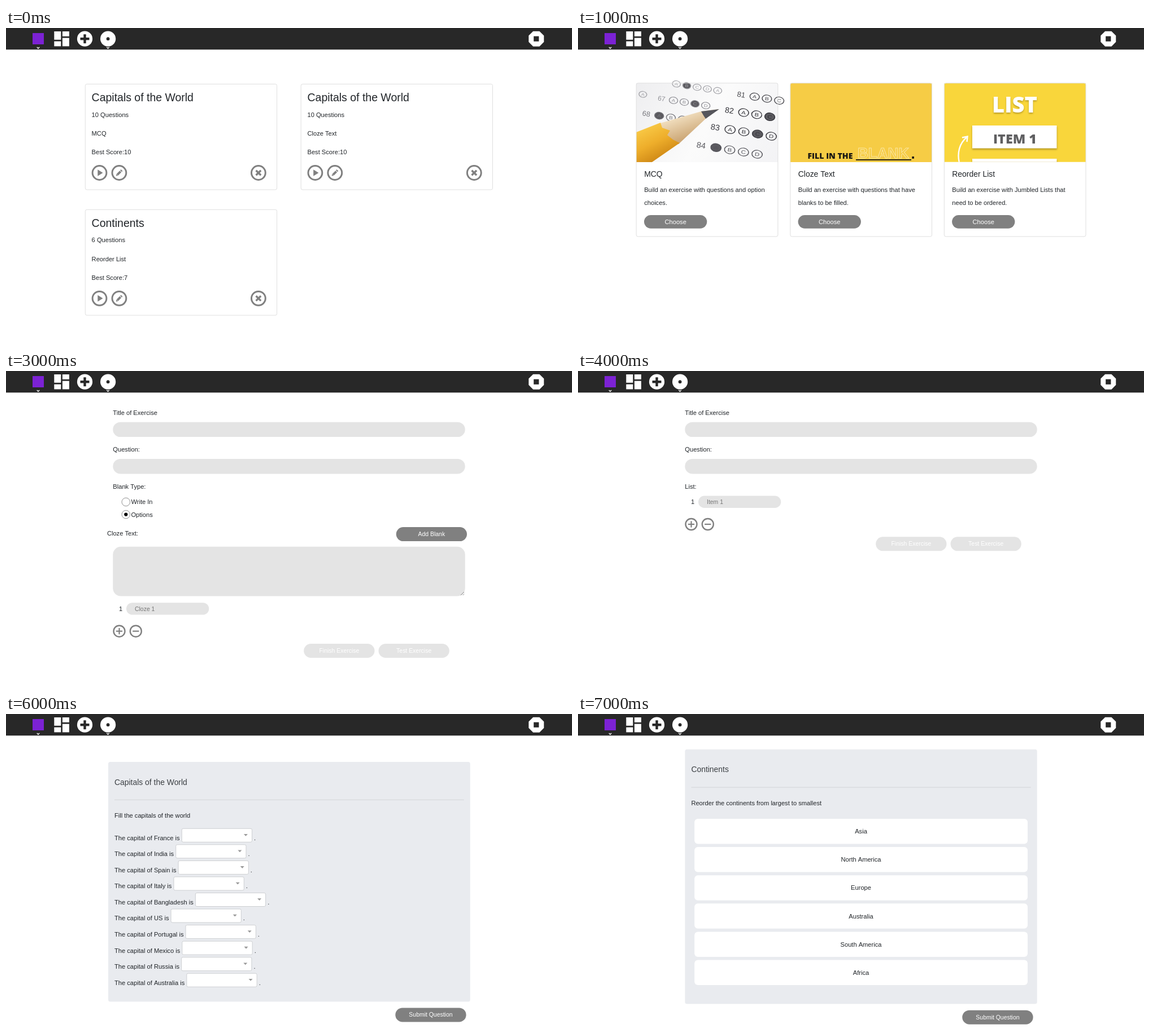
An HTML page with a canvas that plays this animation: 1002 px wide and 559 px high, repeating every 8000 ms.

```html
<!DOCTYPE html>
<html lang="en">
<head>
<meta charset="utf-8">
<title>Exercise builder</title>
<style>
html, body { margin: 0; width: 100%; height: 100%; overflow: hidden; background: #fff; }
canvas { display: block; }
</style>
</head>
<body>
<canvas id="stage" width="1002" height="559"></canvas>
<script>
const ctx = document.getElementById('stage').getContext('2d');
const SANS = '"Liberation Sans", Arial, sans-serif';
const POSTER = '"Open Sans", "Liberation Sans Narrow", sans-serif';
const INK = '#212529', GRAY = '#808080', PALE = '#e4e4e4', BAR = '#282828', PANEL = '#e9ebef';
const BASE = 11.13, SMALL = 10.44, HEAD = 13.92, TITLE = 19.48;
const SCENE_MS = 1000;

// y is the middle of the capitals
function text(s, x, y, size = BASE, color = INK, align = 'left') {
  ctx.font = `${size}px ${SANS}`;
  ctx.textAlign = align;
  ctx.fillStyle = color;
  ctx.fillText(s, x, y + size * 0.36);
}

function rect(x, y, w, h, color) {
  ctx.fillStyle = color;
  ctx.fillRect(x, y, w, h);
}

function box(x, y, w, h, r, fill, stroke) {
  ctx.beginPath();
  ctx.roundRect(x, y, w, h, r);
  if (fill) { ctx.fillStyle = fill; ctx.fill(); }
  if (stroke) { ctx.strokeStyle = stroke; ctx.lineWidth = 1; ctx.stroke(); }
}

function disc(x, y, r, color) {
  ctx.beginPath();
  ctx.arc(x, y, r, 0, Math.PI * 2);
  ctx.fillStyle = color;
  ctx.fill();
}

function ring(x, y, r, width, color = GRAY) {
  ctx.beginPath();
  ctx.arc(x, y, r, 0, Math.PI * 2);
  ctx.lineWidth = width;
  ctx.strokeStyle = color;
  ctx.stroke();
}

function poly(points, color) {
  ctx.beginPath();
  points.forEach(([x, y]) => ctx.lineTo(x, y));
  ctx.closePath();
  ctx.fillStyle = color;
  ctx.fill();
}

function line(points, width, color) {
  ctx.beginPath();
  points.forEach(([x, y]) => ctx.lineTo(x, y));
  ctx.lineWidth = width;
  ctx.strokeStyle = color;
  ctx.stroke();
}

function button(label, x, y, w = 125.3, color = GRAY, h = 25, size = SMALL) {
  box(x, y, w, h, h / 2, color);
  text(label, x + w / 2, y + h / 2 - 0.2, size, '#fff', 'center');
}

function toolbar() {
  rect(0, 0, 1002, 38.3, BAR);
  rect(47, 9, 20, 20, '#7c22d4');
  for (const x of [57, 180.5]) line([[x - 2.2, 34], [x, 36.2], [x + 2.2, 34]], 1.4, '#fff');

  rect(85.3, 6, 12, 14.8, '#fff');
  rect(85.3, 23.6, 12, 8.8, '#fff');
  rect(99.9, 6, 12, 8.8, '#fff');
  rect(99.9, 17.6, 12, 14.8, '#fff');

  disc(139.5, 19.2, 13.6, '#fff');
  rect(131.5, 17, 16, 4.4, BAR);
  rect(137.3, 11.2, 4.4, 16, BAR);

  disc(180.6, 19.2, 13.6, '#fff');
  disc(180.6, 19.2, 2.9, BAR);

  const octagon = Array.from({ length: 8 }, (_, i) => {
    const a = (i + 0.5) * Math.PI / 4;
    return [938.8 + 14.6 * Math.cos(a), 19.2 + 14.6 * Math.sin(a)];
  });
  poly(octagon, '#fff');
  rect(934.2, 14.6, 9.2, 9.2, BAR);
}

function quizCard(x, y, title, count, kind, score) {
  box(x + 0.5, y + 0.5, 339.3, 187.5, 3, '#fff', '#dfdfdf');
  const left = x + 11.8;
  text(title, left, y + 23.8, TITLE);
  text(`${count} Questions`, left, y + 54.5);
  text(kind, left, y + 88);
  text(`Best Score:${score}`, left, y + 121.4);

  const cy = y + 158;
  const [play, edit, drop] = [x + 25.7, x + 60.6, x + 307.1];
  for (const cx of [play, edit, drop]) ring(cx, cy, 12.4, 3);
  poly([[play - 3.2, cy - 5.7], [play + 6, cy], [play - 3.2, cy + 5.7]], GRAY);
  line([[edit - 3.3, cy + 3.3], [edit + 2.4, cy - 2.4]], 4, GRAY);
  line([[edit + 3.1, cy - 3.1], [edit + 4.6, cy - 4.6]], 4, GRAY);
  poly([[edit - 5.6, cy + 5.6], [edit - 5.1, cy + 2.2], [edit - 2.2, cy + 5.1]], GRAY);
  line([[drop - 4.3, cy - 4.3], [drop + 4.3, cy + 4.3]], 3.4, GRAY);
  line([[drop - 4.3, cy + 4.3], [drop + 4.3, cy - 4.3]], 3.4, GRAY);
}

function dashboard() {
  quizCard(139.8, 99, 'Capitals of the World', 10, 'MCQ', 10);
  quizCard(521.7, 99, 'Capitals of the World', 10, 'Cloze Text', 10);
  quizCard(139.8, 321.8, 'Continents', 6, 'Reorder List', 7);
}

// Picks the largest poster size that keeps the words inside the width
function posterFont(s, width, max) {
  ctx.fontStretch = 'condensed';
  ctx.font = `800 ${max}px ${POSTER}`;
  const size = Math.min(max, max * width / ctx.measureText(s).width);
  ctx.font = `800 ${size}px ${POSTER}`;
  ctx.textAlign = 'left';
}

function bubbleRow(x, y, label, count, filled, tone, step = 24.6, r = 8) {
  ctx.save();
  ctx.translate(x, y);
  ctx.rotate(0.16);
  if (label) text(label, 0, 0, r * 1.8, tone, 'center');
  for (let i = 0; i < count; i++) {
    const cx = (i + 1) * step + 2;
    ctx.save();
    ctx.translate(cx, 0);
    ctx.scale(1.15, 0.88);
    if (i === filled) disc(0, 0, r, '#5b5a5f');
    ring(0, 0, r, 1.3, tone);
    text('ABCD'[i % 4], 0, 0, r * 1.25, tone, 'center');
    ctx.restore();
  }
  ctx.restore();
}

function answerSheet() {
  const paper = ctx.createLinearGradient(103, 98, 354, 237);
  paper.addColorStop(0, '#eeeef0');
  paper.addColorStop(0.5, '#fbfbfb');
  paper.addColorStop(1, '#f3f3f5');
  rect(103, 98, 251, 140, paper);

  bubbleRow(154, 96, '', 5, 1, '#a5a5aa', 18.5, 6.3);
  bubbleRow(148, 125, '67', 4, 2, '#929298', 19.3, 6.6);
  bubbleRow(121, 152, '68', 3, 0, '#77777c', 21, 7);
  bubbleRow(104, 116, '', 1, 5, '#a5a5aa', 9, 6);
  bubbleRow(289, 118, '81', 3, -1, '#4b4b50', 22, 7.3);
  bubbleRow(268, 146, '82', 3, 2, '#303036', 23.5, 7.8);
  bubbleRow(243, 176, '83', 4, 2, '#37373d');
  bubbleRow(218, 208, '84', 4, 0, '#55555b');

  const wood = ctx.createLinearGradient(180, 150, 196, 194);
  wood.addColorStop(0, '#f6e6c9');
  wood.addColorStop(1, '#cda877');
  poly([[249, 144], [218, 148], [145, 169], [150, 208], [178, 206], [226, 161]], wood);
  poly([[250, 144], [218, 148], [222, 155], [226, 161]], '#56565c');

  const paint = ctx.createLinearGradient(120, 178, 146, 230);
  paint.addColorStop(0, '#f7c643');
  paint.addColorStop(0.5, '#eeae2b');
  paint.addColorStop(1, '#d18b17');
  poly([[103, 185], [146, 168], [149, 177], [163, 182], [158, 190], [168, 198], [180, 204],
    [131, 238], [103, 238]], paint);
}

function blankPoster() {
  rect(376, 98, 250.5, 140, '#f6cc45');
  posterFont('FILL IN THE', 80, 28);
  ctx.fillStyle = '#171512';
  ctx.fillText('FILL IN THE', 406.5, 231.5);
  ctx.fontStretch = 'normal';
  ctx.font = `bold 26px ${SANS}`;
  ctx.lineWidth = 1;
  ctx.strokeStyle = '#fbe7a6';
  ctx.strokeText('BLANK', 495, 231);
  rect(492, 233, 98, 1.8, '#171512');
  rect(591.3, 228, 3.6, 3.8, '#171512');
}

function shade(blur, dy) {
  ctx.shadowColor = 'rgba(70,50,0,.35)';
  ctx.shadowBlur = blur;
  ctx.shadowOffsetY = dy;
}

function listPoster() {
  ctx.save();
  ctx.beginPath();
  ctx.rect(648.5, 98, 250.5, 139.7);
  ctx.clip();
  rect(648, 98, 251, 140, '#f9d63b');
  shade(3, 2);
  posterFont('LIST', 80, 46);
  ctx.fillStyle = '#fff';
  ctx.fillText('LIST', 733, 150);
  rect(698, 173, 149.5, 40.5, '#fff');
  rect(698, 232, 149.5, 40, '#fff');
  ctx.shadowColor = 'transparent';
  posterFont('ITEM 1', 77, 30);
  ctx.fillStyle = '#5f5f61';
  ctx.fillText('ITEM 1', 735, 204.5);
  ctx.fontStretch = 'normal';

  ctx.beginPath();
  ctx.moveTo(675, 239);
  ctx.bezierCurveTo(671, 222, 675, 205, 688, 194);
  ctx.lineWidth = 2.4;
  ctx.strokeStyle = '#fff';
  ctx.stroke();
  line([[680, 194.5], [689.5, 192.5], [688.5, 202]], 2.4, '#fff');
  ctx.restore();
}

function kindCard(x, title, first, second) {
  box(x + 0.5, 97.8, 250.7, 272.3, 3, null, '#dfdfdf');
  text(title, x + 14.5, 259.3, HEAD);
  text(first, x + 14.5, 287.2);
  text(second, x + 14.5, 309.6);
  button('Choose', x + 14.3, 332, 111.3, GRAY, 23.7, BASE);
}

function chooser() {
  answerSheet();
  blankPoster();
  listPoster();
  kindCard(102.7, 'MCQ', 'Build an exercise with questions and option', 'choices.');
  kindCard(375.3, 'Cloze Text', 'Build an exercise with questions that have', 'blanks to be filled.');
  kindCard(647.8, 'Reorder List', 'Build an exercise with Jumbled Lists that', 'need to be ordered.');
}

function formHead() {
  text('Title of Exercise', 189.3, 73.5);
  box(189.3, 90.7, 623.4, 26.4, 13.2, PALE);
  text('Question:', 189.3, 139);
  box(189.3, 156, 623.4, 26.4, 13.2, PALE);
}

function formTail(y, hint) {
  text('1', 200, y + 10.7);
  box(213, y, 146.3, 21.4, 10.7, PALE);
  text(hint, 228, y + 10.7, SMALL, '#757575');
  const cy = y + 50.5;
  for (const cx of [200.5, 229.8]) {
    ring(cx, cy, 10, 2.4);
    rect(cx - 5.6, cy - 1.1, 11.2, 2.2, GRAY);
  }
  rect(199.4, cy - 5.6, 2.2, 11.2, GRAY);
  button('Finish Exercise', 527.2, y + 72.8, 125.3, PALE);
  button('Test Exercise', 659.5, y + 72.8, 125.3, PALE);
}

function shortForm(label, hint) {
  formHead();
  text(label, 189.3, 204.5);
  formTail(221.5, hint);
}

function clozeForm() {
  formHead();
  text('Blank Type:', 189.3, 204.5);
  ring(212.3, 232.4, 7.3, 1, '#8f8f8f');
  ring(212.3, 254.6, 7.3, 1, '#8f8f8f');
  disc(212.3, 254.6, 3.1, '#000');
  text('Write In', 221.4, 232.2);
  text('Options', 221.4, 254.6);
  text('Cloze Text:', 178.9, 287.8);
  button('Add Blank', 690.7, 277.1);
  box(189.3, 311.8, 623.4, 87.8, 14, PALE);
  line([[805, 398], [811, 392]], 0.9, '#777');
  line([[808.5, 398], [811, 395.5]], 0.9, '#777');
  formTail(411.2, 'Cloze 1');
}

function panel(x, y, w, h, title, prompt) {
  box(x, y, w, h, 3.5, PANEL);
  text(title, x + 11, y + 35.6, HEAD, '#3b3f43');
  rect(x + 11, y + 66.8, w - 22, 1, '#d3d5d8');
  text(prompt, x + 11, y + 95);
}

function playChoice() {
  panel(191.5, 85, 619.5, 139.7, 'Capitals of the World', '1. What is the Capital of India');
  ['New York', 'Paris', 'London', 'New Delhi'].forEach((city, i) => {
    const x = 198.5 + (i % 2) * 257.7, y = 243.3 + (i >> 1) * 40.3;
    box(x, y, 222.6, 25.8, 2.5, '#fff', '#8a8a8a');
    text(city, x + 111.3, y + 12.9, BASE, '#6c757d', 'center');
  });
  button('Submit Question', 678.8, 327.8, 125.3, PALE);
}

function playCloze() {
  panel(181, 85, 640.7, 425.4, 'Capitals of the World', 'Fill the capitals of the world');
  const lands = ['France', 'India', 'Spain', 'Italy', 'Bangladesh', 'US', 'Portugal',
    'Mexico', 'Russia', 'Australia'];
  lands.forEach((land, i) => {
    const y = 203 + i * 28.55;
    const lead = `The capital of ${land} is `;
    text(lead, 192, y + 16.7);
    const x = 192 + ctx.measureText(lead).width;
    box(x + 0.5, y + 0.3, 124.3, 24, 2.5, '#fff', '#cdcfd2');
    poly([[x + 110.2, y + 10], [x + 117.2, y + 10], [x + 113.7, y + 13.8]], '#999');
    text('.', x + 128.3, y + 16.7);
  });
  button('Submit Question', 689.3, 521.4);
}

function playOrder() {
  panel(189.4, 62.8, 623.3, 451.6, 'Continents', 'Reorder the continents from largest to smallest');
  ['Asia', 'North America', 'Europe', 'Australia', 'South America', 'Africa'].forEach((name, i) => {
    const y = 186 + i * 50.1;
    box(206.2, y, 589.8, 44.5, 6, '#fff');
    text(name, 501, y + 22.2, BASE, INK, 'center');
  });
  button('Submit Question', 680.3, 525.7);
}

const scenes = [
  dashboard,
  chooser,
  () => shortForm('Options:', 'Option 1'),
  clozeForm,
  () => shortForm('List:', 'Item 1'),
  playChoice,
  playCloze,
  playOrder
];

const start = performance.now();
let shown = -1;

function tick() {
  const index = Math.floor((performance.now() - start) / SCENE_MS) % scenes.length;
  if (index !== shown) {
    shown = index;
    rect(0, 0, 1002, 559, '#fff');
    toolbar();
    scenes[index]();
  }
  requestAnimationFrame(tick);
}
tick();
</script>
</body>
</html>
```
